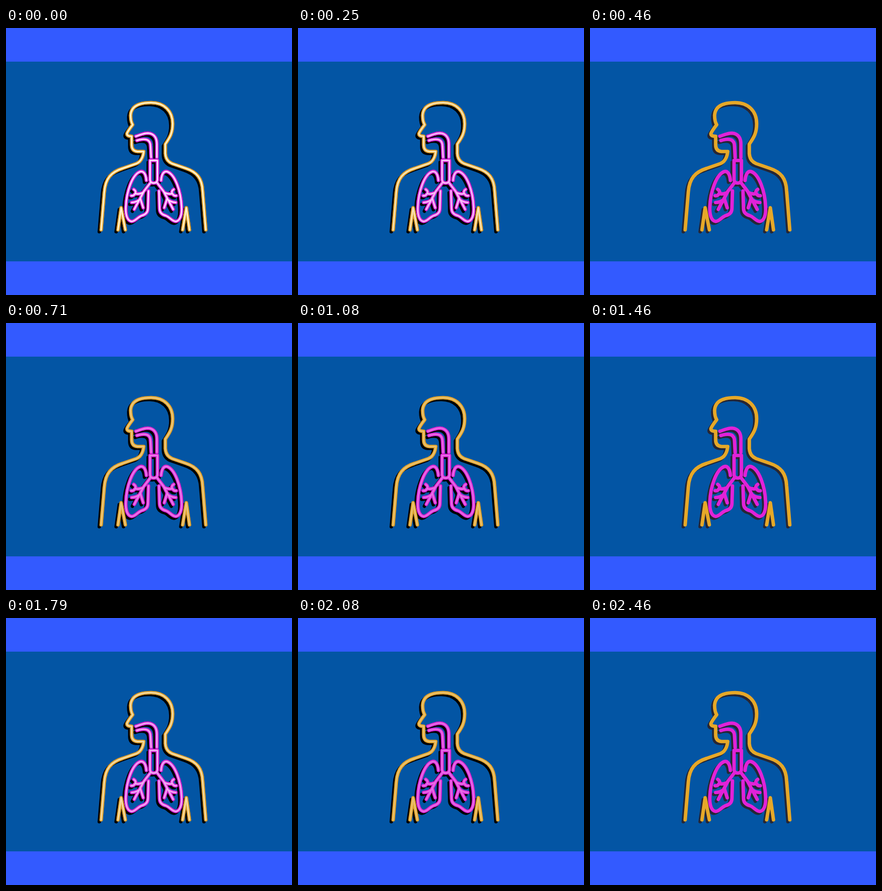
These frames come from a looping animation (544 px wide and 508 px high, 2.5 s). An HTML page:

```html
<!DOCTYPE html>
<html lang="en">
<head>
<meta charset="utf-8">
<title>Neon lungs</title>
<style>
  html, body { margin: 0; width: 100%; height: 100%; overflow: hidden; background: #335aff; }
  svg { display: block; width: 544px; height: 508px; }
  use { fill: none; stroke-linecap: round; stroke-linejoin: round; }
  .tube { stroke-width: 6.6; }
  .glow { stroke-width: 4; }
  .core { stroke-width: 2; }
</style>
</head>
<body>
<svg viewBox="0 0 544 508">
  <defs>
    <path id="body" d="M181 384L187 312C189 286 200 274 222 267L248 258Q260 253 262 235L250 235Q239 234 239 222L239 206Q230 206 230 201Q231 197 241 184Q237 178 237 166C238 148 254 142 276 142C301 142 317 158 317 182C317 201 311 209 303 221L303 239Q304 253 316 258L342 267C363 274 373 286 374 310L380 384M213 384L219 342L227 384M336 384L343 342L349 384"/>
    <g id="lung">
      <path d="M267 290C266 278 262 272 256 273C240 278 229 312 228 340C227 356 231 367 239 368C246 368 250 360 258 357Q270 354 270 343L271 310"/>
      <path d="M275 294L262 311Q257 321 253 328L244 345M261 313Q253 317 246 315M243 307Q249 311 245 316Q242 320 238 319M256 325Q248 332 239 332M256 326L261 342"/>
    </g>
    <g id="airway">
      <path d="M247 206C256 203 262 200 270 200C284 201 287 212 287 221L287 246M249 214Q262 210 269 213Q275 216 275 226L276 246"/>
      <path d="M274 252H288V289Q287 295 281 295Q275 295 274 289Z"/>
      <use href="#lung"/>
      <use href="#lung" transform="matrix(-1 0 0 1 562 0)"/>
    </g>
  </defs>
  <rect width="544" height="508" fill="#335aff"/>
  <rect y="64" width="544" height="380" fill="#0355a4"/>
  <g id="shadow" transform="translate(-3.5 3.5)">
    <use href="#body" class="tube"/>
    <use href="#airway" class="tube"/>
  </g>
  <use href="#body" class="tube" stroke="#e6a828"/>
  <use href="#airway" class="tube" stroke="#e122d8"/>
  <g id="rim">
    <use href="#body" class="tube" stroke="#d08f27"/>
    <use href="#airway" class="tube" stroke="#cb1ccc"/>
  </g>
  <g id="light">
    <use href="#body" class="glow" stroke="#f6cf70"/>
    <use href="#airway" class="glow" stroke="#f27cf0"/>
    <use href="#body" class="core" stroke="#fff6da"/>
    <use href="#airway" class="core" stroke="#ffe4ff"/>
  </g>
</svg>
<script>
  const LOOP = 2500, FPS = 24;
  // Brightness of the tubes over one half-second flicker
  const levels = [1, .7, .42, .35, .42, .5, .85, .75, .58, .4, .2, 0];
  const [shadow, rim, light] = ['shadow', 'rim', 'light'].map(id => document.getElementById(id));

  function draw(ms) {
    const step = Math.floor((ms % LOOP + 5) * FPS / 1000);
    const level = levels[step % levels.length];
    const dark = 1 - Math.min(1, level / .35);
    shadow.setAttribute('stroke', `rgb(${38 * dark},${38 * dark},${52 * dark})`);
    rim.setAttribute('opacity', level);
    light.setAttribute('opacity', level);
  }

  const start = performance.now();
  function tick(now) {
    draw(Math.max(0, now - start));
    requestAnimationFrame(tick);
  }
  draw(0);
  requestAnimationFrame(tick);
</script>
</body>
</html>
```
